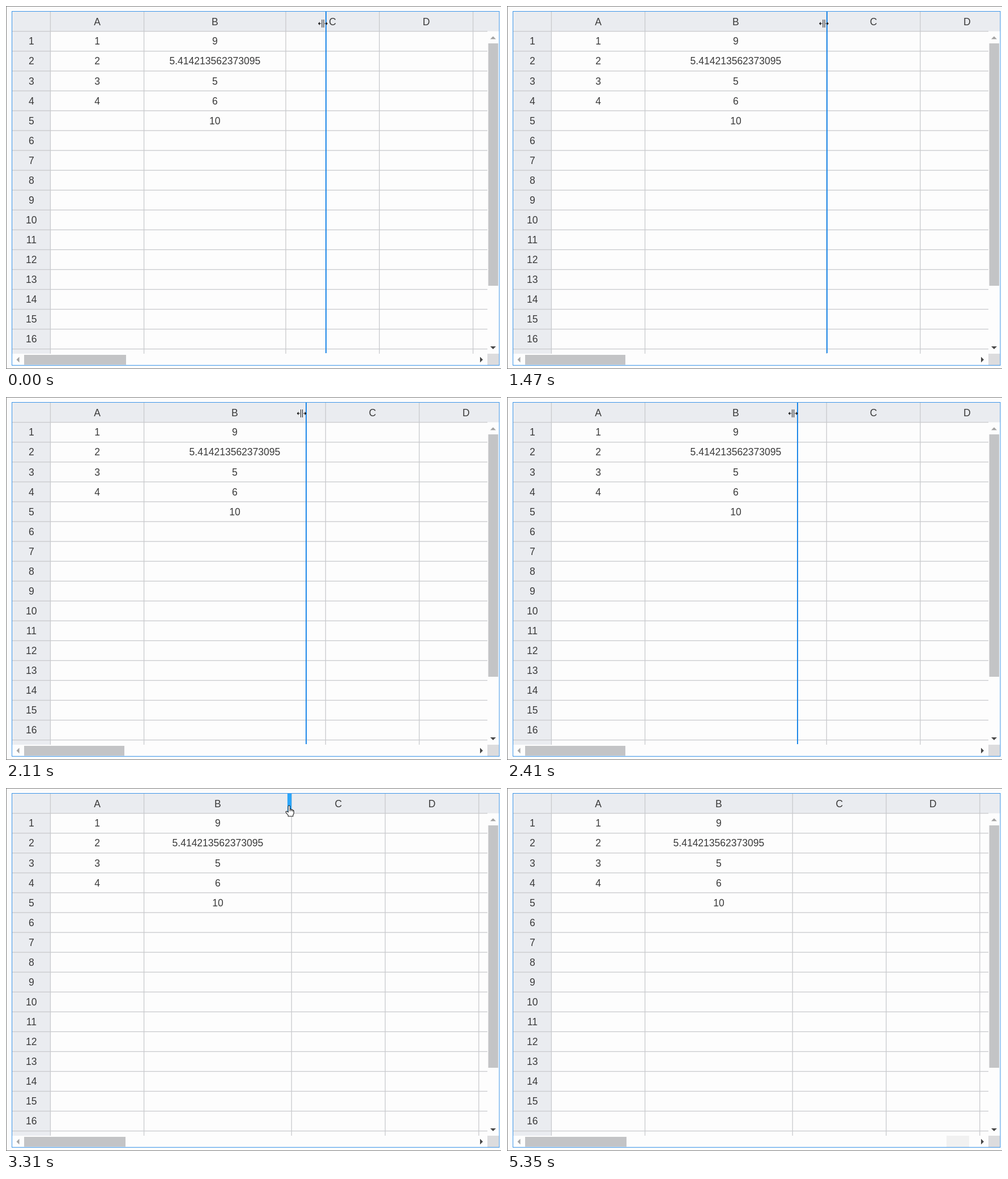
An HTML page with a canvas for the animation above (5.75 s loop, 874 px wide and 641 px high).

```html
<!DOCTYPE html>
<html lang="en">
<head>
<meta charset="utf-8">
<title>Column resize</title>
<style>
html, body { margin: 0; height: 100%; overflow: hidden; background: #fdfdfd; }
canvas { display: block; }
</style>
</head>
<body>
<canvas id="stage" width="874" height="641"></canvas>
<script>
const ctx = document.getElementById('stage').getContext('2d');
const LOOP = 5750, TOP = 44.7, ROW = 35.06, COL = 165.3, COL_A = 78.4, COL_B = 243.6;
const BG = '#fdfdfd', HEAD = '#eaecf0', GRID = '#c9cacd', BLUE = '#1e88e8', EDGE = '#3a94e8';
const cells = [['1', '2', '3', '4'], ['9', '5.414213562373095', '5', '6', '10']];

// Whole steps of the given length since a moment, capped at max
const steps = (t, from, length, max) =>
  Math.max(0, Math.min(max, Math.floor((t - from) / length)));

function rect(color, x, y, w, h) {
  ctx.fillStyle = color;
  ctx.fillRect(x, y, w, h);
}
const vLine = (x, y1, y2) => rect(GRID, x - .65, y1, 1.3, y2 - y1);
const hLine = (y, x1, x2) => rect(GRID, x1, y - .65, x2 - x1, 1.3);

function label(s, x, y) {
  ctx.fillStyle = '#3a3a3a';
  ctx.fillText(s, x, y + 6.2);
}

function triangle(color, x, y, dx, dy) {
  ctx.fillStyle = color;
  ctx.beginPath();
  ctx.moveTo(x + dx * 2.5, y + dy * 2.5);
  ctx.lineTo(x - dx * 2.5 + dy * 5, y - dy * 2.5 + dx * 5);
  ctx.lineTo(x - dx * 2.5 - dy * 5, y - dy * 2.5 - dx * 5);
  ctx.fill();
}

function grid(right) {
  const xs = [COL_A, COL_B, right, right + COL, right + 2 * COL];
  rect(HEAD, 11, 10, 860, TOP - 10);
  rect(HEAD, 11, 10, COL_A - 11, 604);
  ctx.font = '17.53px "Liberation Sans", Arial, sans-serif';
  ctx.textAlign = 'center';
  xs.forEach((x, i) => {
    if (x < 870) vLine(x, 10, x < 850 ? 614 : TOP);
    if (i < 4) label('ABCD'[i], (x + xs[i + 1]) / 2, 27.3);
  });
  for (let r = 0; r <= 16; r++) {
    hLine(TOP + r * ROW, 11, 850);
    if (r < 16) label(String(r + 1), 44.8, TOP + (r + .5) * ROW);
  }
  cells.forEach((col, c) => col.forEach((s, r) =>
    label(s, (xs[c] + xs[c + 1]) / 2, TOP + (r + .5) * ROW)));
}

function scrollbars(thumbEnd, trackLit) {
  const thumb = '#c3c4c6', dim = '#a2a2a2', dark = '#484848';
  rect(BG, 850, 45.4, 21, 569);
  rect(BG, 11, 614, 839, 20);
  if (trackLit) rect('#f1f1f1', 776, 614, 40, 20);
  rect(thumb, 851.5, 66, 17.5, 428);
  rect(thumb, 32, 616, thumbEnd - 32, 17.5);
  rect('#dcdcde', 850, 614, 20.5, 20);
  triangle(dim, 860, 56, 0, -1);
  triangle(dark, 860, 603.5, 0, 1);
  triangle(dim, 21, 624.5, -1, 0);
  triangle(dark, 839.5, 624.5, 1, 0);
}

function frameLines() {
  const gray = '#7c7c7c';
  rect(gray, 0, 0, 874, 1);
  rect(gray, 0, 640, 874, 1);
  rect(gray, 0, 0, 1, 641);
  ctx.strokeStyle = EDGE;
  ctx.lineWidth = 1;
  ctx.strokeRect(10.5, 9.5, 860.5, 625);
}

function resizeCursor(x, y) {
  const ink = '#161616';
  for (const d of [-1, 1]) {
    rect(ink, x + d * 1.5 - .5, y - 7, 1, 14);
    rect(ink, x + d * 4.5 - 1.5, y - .5, 3, 1);
    ctx.beginPath();
    ctx.moveTo(x + d * 8.5, y);
    ctx.lineTo(x + d * 5.5, y - 3);
    ctx.lineTo(x + d * 5.5, y + 3);
    ctx.fill();
  }
}

const hand = new Path2D('M-2 11V1.7Q-2 0-.4 0Q1.2 0 1.2 1.7V6.5Q2.7 5.8 3.8 7.2' +
  'Q5.4 6.6 6.3 8.2Q8 8 8 10V13.5Q8 15 6.6 16.7V19H-2V17L-5.7 12.6Q-6.8 10.4-5 10Q-3.6 10-2 12Z');
const knuckles = new Path2D('M1.2 6.5V10M3.8 7.2V10M6.3 8.2V10.5');
const arrow = new Path2D('M0 0V16.5L3.8 13L6.3 18.7L8.8 17.6L6.3 12H11.5Z');

function pointer(shape, x, y) {
  ctx.save();
  ctx.translate(x, y);
  ctx.fillStyle = '#fff';
  ctx.strokeStyle = '#1a1a1a';
  ctx.lineWidth = 1.1;
  ctx.lineJoin = 'round';
  ctx.fill(shape);
  ctx.stroke(shape);
  if (shape === hand) ctx.stroke(knuckles);
  ctx.restore();
}

// The guide eases left, pauses, then creeps on at an even pace
function guideX(t) {
  if (t < 1840) return 564.5;
  if (t < 2500) return 560.5 - 47.9 * (1 - (1 - steps(t, 1840, 67, 8) / 8) ** 1.5);
  return 511.8 - 1.35 * steps(t, 2500, 66, 5);
}

function guide(x) {
  const left = Math.floor(x);
  rect(BLUE, left, 10, Math.floor(x + 1.5) - left, 603);
}

function draw(t) {
  const [right, thumbEnd] = t < 480 ? [494, 212] : t < 3250 ? [564.3, 209] : [504.2, 211];
  const dragging = t < 480 || (t >= 1470 && t < 3250);
  const released = (t >= 480 && t < 540) || (t >= 3250 && t < 3310);
  rect(BG, 0, 0, 874, 641);
  grid(right);
  scrollbars(thumbEnd, t >= 5350);
  frameLines();

  if (dragging) guide(guideX(t));
  if (dragging || released) {
    const moved = t >= 1840;
    resizeCursor(guideX(t) - (moved ? 7.5 : 5), moved ? 29 : 31);
  } else if (t < 4810) {
    rect('#2ba6fa', right - 7.3, 10, 7.3, 35);
    pointer(hand, right - 4, 31);
  } else if (t < 5350) {
    const u = steps(t, 4810, 67.5, 7) / 7;
    pointer(arrow, 498 + 290 * u ** 1.6, 42 + 580 * u ** 1.3);
  }
}

const start = performance.now();
function tick() {
  draw((performance.now() - start) % LOOP);
  requestAnimationFrame(tick);
}
tick();
</script>
</body>
</html>
```
